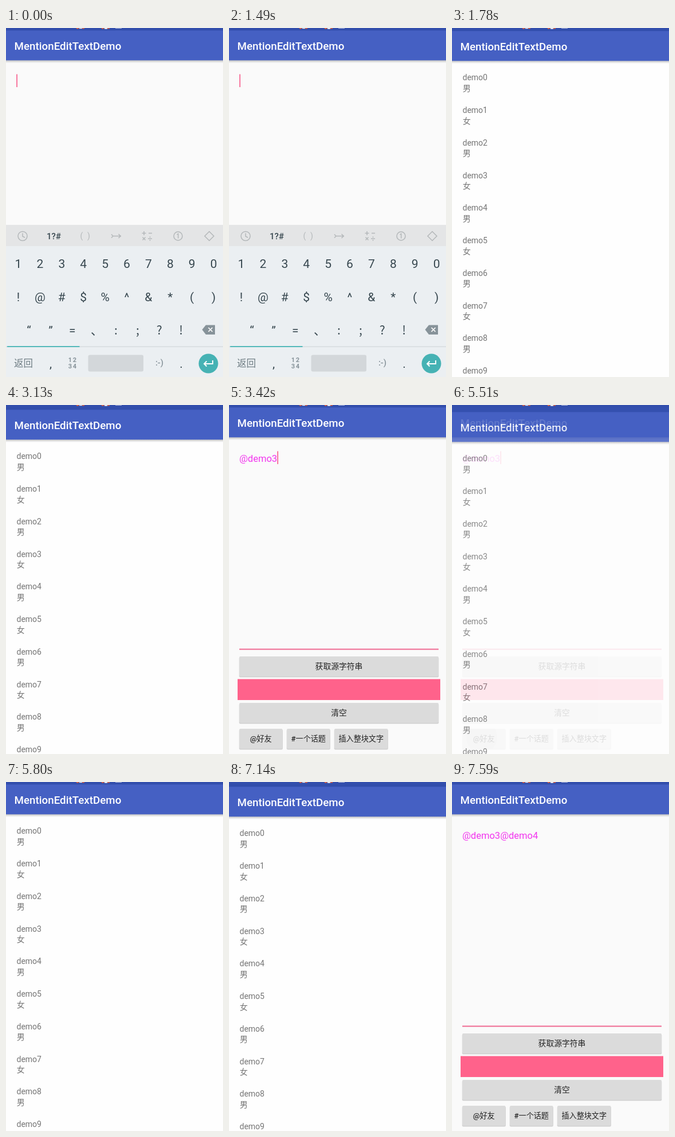
Animation of 379 by 608 pixels, one loop 8000 ms. Source, as an HTML page:

```html
<!DOCTYPE html>
<html lang="zh">
<head>
<meta charset="utf-8">
<title>MentionEditTextDemo</title>
<style>
  html, body { margin: 0; width: 100%; height: 100%; overflow: hidden; background: #fafafa; }
  svg { display: block; width: 379px; height: 608px; }
  text { font-family: Roboto, "Noto Sans CJK SC", "Noto Sans CJK", sans-serif; white-space: pre; }
  .mid { text-anchor: middle; }
  .title { font-size: 18.75px; font-weight: 500; fill: #fff; }
  .row { font-size: 14px; fill: #757575; }
  .key { font-size: 21px; fill: #37474f; }
  .cjk { font-family: "Noto Sans CJK SC", "Noto Sans CJK", sans-serif; }
  .label { font-weight: 500; fill: #222; }
  .thin { fill: none; stroke: #b4b8ba; stroke-width: 1.5; }
  .faint { fill: #b4b8ba; }
  .soft { fill: #87939a; }
</style>
</head>
<body>
<svg viewBox="0 0 379 608">
  <defs>
    <linearGradient id="shade" x2="0" y2="1">
      <stop offset="0" stop-color="#000" stop-opacity=".24"/>
      <stop offset="1" stop-color="#000" stop-opacity="0"/>
    </linearGradient>
    <clipPath id="press"><rect x="18" y="564" width="75.5" height="35" rx="2"/></clipPath>
    <g id="header">
      <rect y="56" width="379" height="5" fill="url(#shade)"/>
      <rect y="-60" width="379" height="65" fill="#324eac"/>
      <rect y="4.3" width="379" height="52" fill="#4560c3"/>
      <text class="title" x="14.6" y="37.8">MentionEditTextDemo</text>
    </g>
  </defs>

  <rect width="379" height="608" fill="#fafafa"/>
  <use href="#header"/>
  <text id="input" x="18" y="98.7" font-size="16.55" fill="#f234ee"></text>
  <rect id="cursor" y="80.5" width="1.7" height="22.5" fill="#f8628f"/>

  <g id="form">
    <rect x="18" y="424.5" width="348" height="2" fill="#f06a92"/>
    <rect x="15" y="477.5" width="354" height="36.5" fill="#ff628b"/>
    <g id="buttons"></g>
  </g>

  <g id="keyboard">
    <rect y="343" width="379" height="38" fill="#e4e5e6"/>
    <rect y="380" width="379" height="228" fill="#ebeff2"/>
    <g class="thin">
      <circle cx="29" cy="362.5" r="8"/>
      <path d="M29 357.5v5.5l4 2"/>
      <path d="M184 359.5l3 3-3 3M187 362.5h13M196.5 359l3.8 3.5-3.8 3.5"/>
      <path d="M237.500 357.500h7M241 354v7M249 357.500h6M238.500 364.500l5 5M243.500 364.500l-5 5M248 367h7"/>
      <circle cx="300.500" cy="362.500" r="7.500"/>
      <path d="M298.500 360l2.200-1.500v8M355 354.500l8 8-8 8-8-8z"/>
    </g>
    <circle class="faint" cx="251.500" cy="364.300" r="1"/>
    <circle class="faint" cx="251.500" cy="369.700" r="1"/>
    <text class="mid" x="83.500" y="367.700" font-size="15" font-weight="500" fill="#37474f">1?#</text>
    <text class="mid faint" x="132" y="367" font-size="14">(</text>
    <text class="mid faint" x="144.500" y="367" font-size="14">)</text>
    <g id="keys"></g>
    <path d="M342.500 525.500l6.500-8h16v16.500h-16z" fill="#87939a"/>
    <path d="M353.500 522l7 7m0-7l-7 7" stroke="#fff" stroke-width="1.700"/>
    <rect y="554.500" width="379" height="1.500" fill="#d6dbdf"/>
    <rect x="2" y="554" width="126.500" height="2" fill="#55b9ba"/>
    <text class="mid cjk" x="30.500" y="589.800" font-size="16.500" fill="#6f7d84">返回</text>
    <g class="soft mid" font-size="11" font-weight="700">
      <text x="112" y="582">1</text><text x="120" y="582">2</text>
      <text x="112" y="593">3</text><text x="120" y="593">4</text>
    </g>
    <rect x="143.500" y="569.500" width="96.500" height="29" rx="3" fill="#d3d7da"/>
    <text class="mid soft" x="268" y="588" font-size="15" font-weight="500">:-)</text>
    <circle cx="353.500" cy="584.500" r="17" fill="#46b2b4"/>
    <path d="M361 579v6h-15m4.500-4.500l-4.500 4.500 4.500 4.500" fill="none" stroke="#fff" stroke-width="1.900"/>
  </g>

  <g id="list">
    <rect y="-60" width="379" height="668" fill="#fefefe"/>
    <use href="#header"/>
    <g id="rows"></g>
  </g>

  <g id="status">
    <circle cx="125" cy="-1" r="2.800" fill="#e8623a"/>
    <rect x="128" width="5" height="1.200" fill="#eee"/>
    <circle cx="135" cy="-1" r="2.500" fill="#e8623a"/>
    <circle cx="169" cy="-1" r="2.800" fill="#e8623a"/>
    <rect x="172" width="5" height="1.800" fill="#eee"/>
    <circle cx="179" cy="-1" r="2.500" fill="#e8623a"/>
    <rect x="191" width="11" height="1" fill="#aab4da"/>
  </g>
</svg>
<script>
const NS = 'http://www.w3.org/2000/svg';
const $ = id => document.getElementById(id);

function add(parent, tag, attrs, text = '') {
  const el = document.createElementNS(NS, tag);
  for (const k in attrs) el.setAttribute(k, attrs[k]);
  el.textContent = text;
  return parent.appendChild(el);
}

function button(x, y, w, h, label, size) {
  const g = $('buttons');
  add(g, 'rect', { x: x - .5, y: y + 1.5, width: w + 1, height: h, rx: 2, fill: '#000', opacity: .1 });
  add(g, 'rect', { x, y: y + .8, width: w, height: h, rx: 2, fill: '#000', opacity: .12 });
  add(g, 'rect', { x, y, width: w, height: h, rx: 2, fill: '#dbdbdb' });
  if (label === '@好友') {
    add(g, 'circle', { id: 'ripple', cx: 52, cy: 579, r: 27, fill: '#c9c9c9', 'clip-path': 'url(#press)' });
  }
  add(g, 'text', { class: 'mid label', x: x + w / 2, y: y + h / 2 + size * .36, 'font-size': size }, label);
}
button(18, 438, 348, 35, '获取源字符串', 13.8);
button(18, 519, 348, 35, '清空', 13.8);
button(18, 564, 75.5, 35, '@好友', 13.1);
button(101, 564, 75.5, 35, '#一个话题', 13.1);
button(184, 564, 93.5, 35, '插入整块文字', 13.1);

function keyRow(chars, x, y, cls = '') {
  [...chars].forEach((c, i) =>
    add($('keys'), 'text', { class: 'key mid ' + cls, x: x + i * 37.9, y }, c));
}
keyRow('1234567890', 21.5, 418.3);
keyRow('!@#$%^&*()', 21.5, 476);
keyRow('“”=', 40, 533.5);
keyRow('、', 158.5, 533.5, 'cjk');
keyRow(':;?!', 192, 533.5, 'cjk');
keyRow(',', 78, 591.5);
keyRow('.', 306, 591.5);

for (let i = 0; i < 10; i++) {
  const y = 90.4 + i * 56.75;
  add($('rows'), 'text', { class: 'row', x: 18.5, y }, 'demo' + i);
  add($('rows'), 'text', { class: 'row cjk', x: 18.8, y: y + 18.4 }, i % 2 ? '女' : '男');
}

// time, mentions, cursor, list opacity, list offset, ripple
const LOOP = 8000;
const steps = [
  [0, 0, 1], [300, 0, 0], [750, 0, 1], [1200, 0, 0], [1340, 0, 1],
  [1640, 0, 1, .85, 8], [1780, 0, 1, 1, 1], [1930, 0, 1, 1, 0],
  [3130, 1, 1, 1, 4], [3280, 1, 1, .35, 30], [3420, 1, 1],
  [3720, 1, 0], [4170, 1, 1], [4770, 1, 0], [5220, 1, 1],
  [5360, 1, 1, 0, 0, 1], [5510, 1, 1, .85, 8, 1],
  [5650, 1, 1, 1, 1], [5800, 1, 1, 1, 0],
  [7000, 2, 1, 1, 4], [7150, 2, 1, .35, 30], [7300, 2, 1], [7590, 2, 0]
];
const texts = ['', '@demo3', '@demo3@demo4'];
const cursorX = [18.2, 84.3, 150.8];
const show = (id, on) => $(id).setAttribute('visibility', on ? 'visible' : 'hidden');

let last;
function draw(t) {
  const step = steps.findLast(s => s[0] <= t);
  if (step === last) return;
  last = step;
  const [, n, cursor, alpha = 0, dy = 0, ripple = 0] = step;
  $('input').textContent = texts[n];
  $('cursor').setAttribute('x', cursorX[n]);
  show('cursor', cursor);
  show('keyboard', n === 0);
  show('form', n > 0);
  show('ripple', ripple);
  $('list').setAttribute('opacity', alpha);
  $('list').setAttribute('transform', `translate(0 ${dy})`);
}

const start = performance.now();
function tick() {
  draw((performance.now() - start) % LOOP);
  requestAnimationFrame(tick);
}
tick();
</script>
</body>
</html>
```
